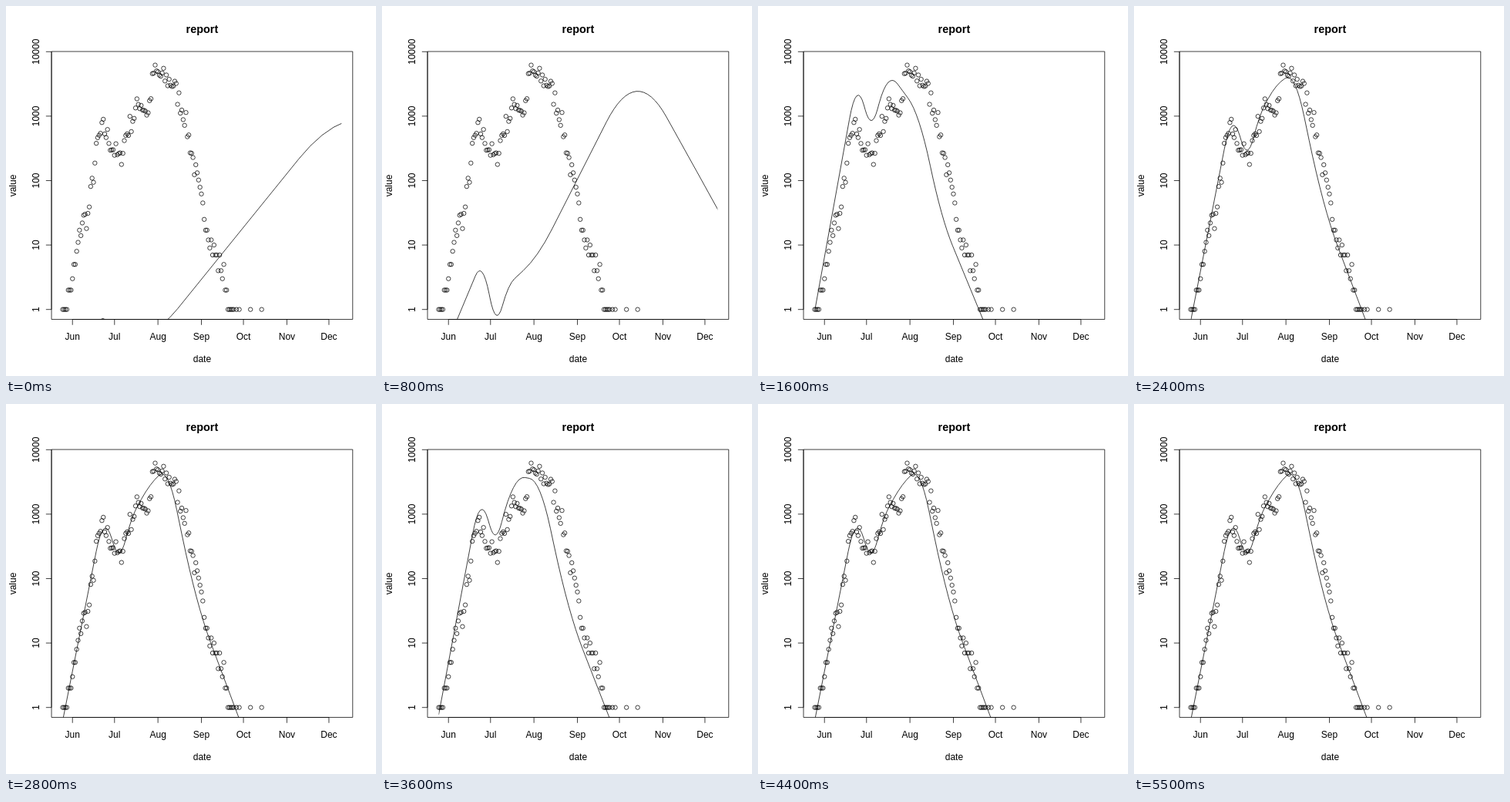
Recreate the animation shown at these times as an HTML page. Size 480 px wide and 480 px high, loop 6100 ms.

```html
<!DOCTYPE html>
<html lang="en">
<head>
<meta charset="utf-8">
<title>report</title>
<style>
  html, body { margin: 0; width: 100%; height: 100%; overflow: hidden; background: #fff; }
  svg { display: block; width: 480px; height: 480px; }
  text { font: 12px "Liberation Sans", Arial, sans-serif; text-anchor: middle; fill: #000; }
  .title { font-size: 14.4px; font-weight: bold; }
  .ink { fill: none; stroke: #000; stroke-width: 0.75; }
</style>
</head>
<body>
<svg viewBox="0 0 480 480">
  <clipPath id="plot"><rect x="73.5" y="59" width="361.8" height="347.6"/></clipPath>
  <g id="chart"></g>
  <path id="curve" class="ink" clip-path="url(#plot)"/>
</svg>
<script>
const LOOP = 6100, STEP = 100;
const LEFT = 59.04, TOP = 59.04, RIGHT = 449.76, BOTTOM = 406.56, TICK = 7.2;

const dayX = day => 86.24 + 1.818 * day;   // day 0 is 1 June
const valueY = v => 393.69 - 83.6 * Math.log10(v);
const lerp = (a, b, t) => a + (b - a) * t;

const chart = document.getElementById('chart');
function add(tag, attrs, text) {
  const el = document.createElementNS('http://www.w3.org/2000/svg', tag);
  for (const k in attrs) el.setAttribute(k, attrs[k]);
  if (text) el.textContent = text;
  chart.append(el);
}
const line = d => add('path', { class: 'ink', d });
const label = (x, y, s, cls = '') => add('text', { x, y, class: cls }, s);
const sideLabel = (x, y, s) => add('text', { transform: `translate(${x} ${y}) rotate(-90)` }, s);

// Frame, axes and titles
line(`M${LEFT} ${TOP}H${RIGHT}V${BOTTOM}H${LEFT}Z`);
label(254.4, 35, 'report', 'title');
label(254.4, 462, 'date');
sideLabel(13, 233, 'value');

const months = { Jun: 0, Jul: 30, Aug: 61, Sep: 92, Oct: 122, Nov: 153, Dec: 183 };
line(`M${dayX(months.Jun)} ${BOTTOM}H${dayX(months.Dec)}`);
for (const name in months) {
  const x = dayX(months[name]);
  line(`M${x} ${BOTTOM}v${TICK}`);
  label(x, 433, name);
}

line(`M${LEFT} ${valueY(1)}V${valueY(1e4)}`);
for (let v = 1; v <= 1e4; v *= 10) {
  line(`M${LEFT} ${valueY(v)}h${-TICK}`);
  sideLabel(43, valueY(v), String(v));
}

// Daily counts scatter around a trend given as [day, value]
const trend = [[-7, 1], [-5, 1], [0, 2.8], [7, 24], [11, 27], [18, 400], [22, 650], [28, 350],
  [34, 200], [38, 500], [48, 1700], [54, 1100], [58, 4800], [72, 3200], [80, 1000], [92, 45],
  [100, 9], [109, 3], [111, 1], [115, 1]];
const SPREAD = 0.17;
let seed = 7;
const random = () => (seed = seed * 16807 % 2147483647) / 2147483647;

const dot = (day, v) => add('circle', { class: 'ink', cx: dayX(day), cy: valueY(v), r: 2.7 });
for (let day = -7, i = 0; day <= 115; day++) {
  if (day > trend[i + 1][0]) i++;
  const [d0, v0] = trend[i], [d1, v1] = trend[i + 1];
  const log = lerp(Math.log10(v0), Math.log10(v1), (day - d0) / (d1 - d0));
  dot(day, Math.round(10 ** (log + SPREAD * (2 * random() - 1))));
}
[117, 119, 127, 135].forEach(day => dot(day, 1));

// Corners of each curve: start, first peak, dip, shoulder, climb, main peak, tail, foot
const flat = [[73.5, 508], [129, 392], [148, 475], [164, 430], [203, 417], [440, 124], [560, 185], [620, 260]];
const autumn = [[73.5, 464], [130, 329], [148, 418], [164, 361], [202, 326], [330, 74], [408, 214], [450, 290]];
const high = [[73.5, 396], [128, 95], [147, 163], [163, 105], [175, 93], [209, 139], [238, 276], [292, 407]];
const mid = [[73.5, 403], [127.5, 116], [147.5, 184], [163, 123], [178, 94], [205, 99], [242, 271], [295, 407]];
const fit = [[73.5, 411], [127, 141], [147, 207], [163, 146], [187, 103], [210, 82], [247, 260], [302, 407]];

const blend = (a, b, t) => a.map(([x, y], i) => [lerp(x, b[i][0], t), lerp(y, b[i][1], t)]);
const near = blend(fit, mid, 0.25);
const over = blend(fit, mid, -1);

// Straight runs joined by parabolas half as wide as the shorter neighbour
function rounded(pts) {
  const toward = (p, q, r) => {
    const t = r / Math.abs(q[0] - p[0]);
    return `${lerp(p[0], q[0], t).toFixed(2)} ${lerp(p[1], q[1], t).toFixed(2)}`;
  };
  let d = `M${pts[0]}`;
  for (let i = 1; i < pts.length - 1; i++) {
    const [a, p, b] = pts.slice(i - 1, i + 2);
    const r = Math.min(p[0] - a[0], b[0] - p[0]) / 2;
    d += `L${toward(p, a, r)}Q${p} ${toward(p, b, r)}`;
  }
  return d + `L${pts[pts.length - 1]}`;
}

// One search around the best fit, settling in nine steps
const search = t => [[t - STEP, fit], [t, mid], [t + 100, over], [t + 400, near], [t + 800, fit]];
const keys = [
  [0, flat], [100, flat], [800, autumn], [1400, over], [1500, fit], [1600, high], [1800, fit],
  ...search(2000), ...search(3600), [LOOP, fit]
];

const curve = document.getElementById('curve');
function draw(time) {
  const t = Math.floor(time / STEP) * STEP;
  const i = keys.findIndex(k => k[0] > t);
  const [ta, a] = keys[i - 1], [tb, b] = keys[i];
  curve.setAttribute('d', rounded(blend(a, b, (t - ta) / (tb - ta))));
}

const start = performance.now();
function tick() {
  draw((performance.now() - start) % LOOP);
  requestAnimationFrame(tick);
}
tick();
</script>
</body>
</html>
```
